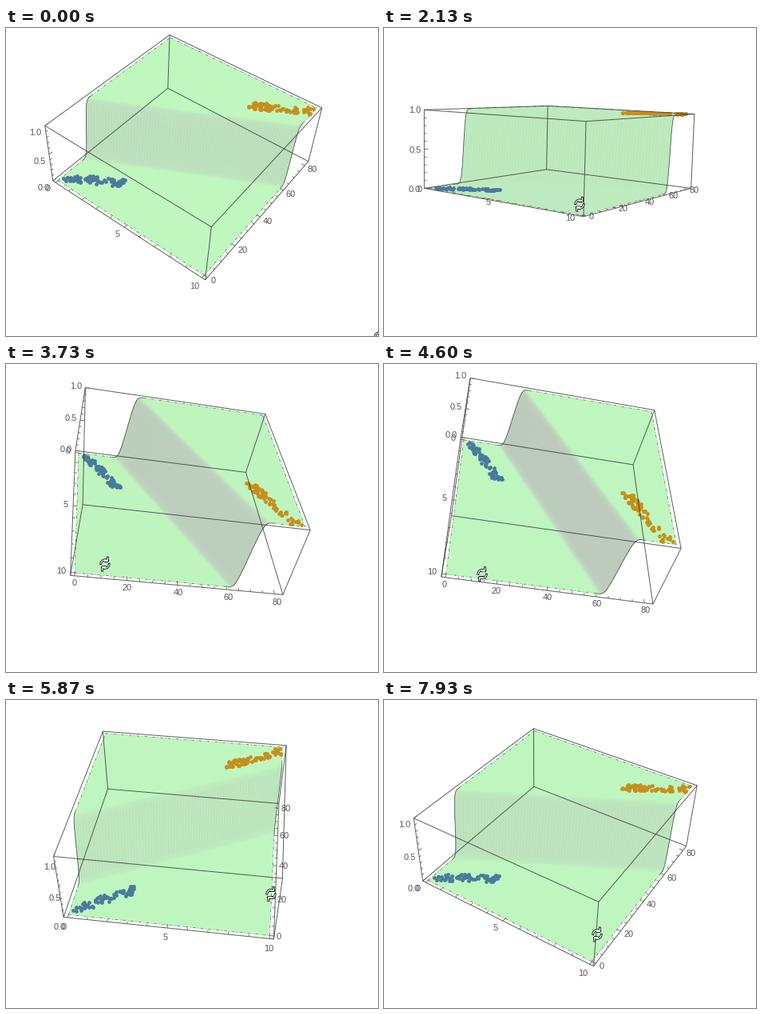
These frames come from a looping animation (466 by 385 pixels, 8 s). A matplotlib script:

```python
from itertools import combinations, product

import numpy as np
import matplotlib.pyplot as plt
from matplotlib.animation import FuncAnimation
from matplotlib.collections import LineCollection, PolyCollection

W, H, DPI = 466, 385, 100
PX = 72 / DPI
FRAMES, STEP = 160, 50
LO = np.array([-0.2, -1.6, 0.0])
HI = np.array([10.2, 83.6, 1.0])
SIDES = np.array([1.0, 1.0, 0.4])
EYE = 3.45
STEEP = 1.7
X_END, Y_END = 10, 82


def look(az, el, roll, size, center, hand):
    """Camera and pointer state as one vector; angles in degrees."""
    return np.array([*np.radians([az, el, roll]), size, *center, *hand])


def project(pts, state):
    """Data points to pixels in perspective."""
    az, el, roll, size, cx, cy = state[:6]
    p = (np.asarray(pts, float) - LO) / (HI - LO) - 0.5
    x, y, z = (p * SIDES).T
    right = x * np.cos(az) - y * np.sin(az)
    away = x * np.sin(az) + y * np.cos(az)
    up = z * np.cos(el) + away * np.sin(el)
    f = size * EYE / (EYE + away * np.cos(el) - z * np.sin(el))
    c, s = np.cos(roll), np.sin(roll)
    return np.column_stack([cx + f * (right * c + up * s),
                            cy - f * (up * c - right * s)])


start = look(-34.2, 44.5, 3.6, 238, (225, 146), (247, 310))
tilted = look(-37.2, 34.1, 1.3, 238, (225, 153), (245, 282))
level = look(-37.2, 3.5, 1.3, 240, (223, 153), (245, 214))
low = look(-51.8, 4.3, 2.0, 242, (217.5, 152), (195, 213))
side = look(-75.6, 34.3, 15.1, 251, (216.5, 152), (124, 250))
over = side + 0.4 * (side - low)
mid = look(-45.3, 19.9, 0.6, 243, (223, 154.5), (247, 253))
above = look(23.0, 58.2, 0.0, 251, (216.5, 161), (400, 234))
last = look(-31.5, 38.9, 1.5, 247.5, (220.5, 166.5), (267, 293))

# Drags with rests between them, times in ms.
TRACK = [(1133, start), (1467, tilted), (2200, level), (2533, level),
         (3067, low), (3733, side), (4133, over), (4467, over),
         (5200, mid), (6400, above), (6867, above), (7933, last)]
TIMES, STATES = zip(*TRACK)


def state_at(t):
    return np.array([np.interp(t, TIMES, col) for col in zip(*STATES)])


# Box edges join corners that differ in one coordinate.
CORNERS = np.array([np.where(k, HI, LO) for k in product((0, 1), repeat=3)])
EDGES = [(a, b) for a, b in combinations(range(8), 2)
         if np.sum(CORNERS[a] != CORNERS[b]) == 1]


def ridge(x):
    return 20.3 + 4.45 * x


def sigmoid(u):
    return 1 / (1 + np.exp(-STEEP * u))


U = np.linspace(-4.5, 4.5, 41)


def rim(x):
    """Surface profile at fixed x, from y = 0 to the far end."""
    y = np.concatenate([[0], ridge(x) + U, [Y_END]])
    z = np.concatenate([[0], sigmoid(U), [1]])
    return np.column_stack([np.full_like(y, x), y, z])


RIM0, RIM1 = rim(0), rim(X_END)
RIBS = [rim(x)[14:-14] for x in np.linspace(0.1, 9.9, 70)]

height = sigmoid((U[1:] + U[:-1]) / 2)
grade = 0.4 * STEEP * height * (1 - height) * (HI - LO)[1] * 1.13
STEEPNESS = np.concatenate([[0], grade / np.hypot(grade, 1), [0]])[:, None]
SLOPE_NORMAL = np.array([0.46, -0.88, 0.1])

rng = np.random.default_rng(4)


def cloud(n=72):
    """Distances from a corner along x and y, scattered about a diagonal."""
    d = rng.uniform(0.02, 2.95, n)
    return d, 5 * d + rng.uniform(0, 5.5, n)


dx, dy = cloud()
BLUE = np.column_stack([dx, dy, 0 * dx])
dx, dy = cloud()
GOLD = np.column_stack([X_END - dx, Y_END - dy, 0 * dx + 1])

# Axes: corner, coordinate, labelled values, format, minor step, side, pad.
AXES = [
    (LO, 0, np.arange(0, 11, 5), "{:.0f}", 1, (0, -1, 0), 4),
    ([HI[0], LO[1], 0], 1, np.arange(0, 81, 20), "{:.0f}", 5, (1, 0, 0), 1),
    (LO, 2, np.arange(0, 1.1, 0.5), "{:.1f}", 0.1, (0, -1, 0), 4),
]

fig = plt.figure(figsize=(W / DPI, H / DPI), dpi=DPI, facecolor="white")
ax = fig.add_axes([0, 0, 1, 1])
ax.set_xlim(0, W)
ax.set_ylim(H, 0)
ax.axis("off")


def lines(color, width, z, style="-"):
    coll = LineCollection([], colors=[color], linewidths=width * PX,
                          linestyles=style, zorder=z)
    ax.add_collection(coll, autolim=False)
    return coll


def dots(color):
    return ax.scatter([], [], c=color, s=(4.8 * PX) ** 2, linewidths=0,
                      zorder=4)


faces = PolyCollection([], antialiaseds=False, linewidths=0, zorder=1)
ax.add_collection(faces, autolim=False)
ribs = lines((0.6, 0.55, 0.6, 0.06), 1.3, 2)
curves = lines("#4c564c", 0.8, 3)
borders = lines("#5c6c5c", 0.7, 3, (0, (5, 4, 1, 4)))
box = lines((0.2, 0.2, 0.2, 0.78), 1, 5)
ticks = lines("#666666", 0.9, 5)
blue, gold = dots("#4a7a9c"), dots("#c68f1c")
labels = [[ax.text(0, 0, fmt.format(v), family="Liberation Sans",
                   fontsize=11 * PX, color="#555555", ha="center",
                   va="center", zorder=6) for v in values]
          for _, _, values, fmt, *_ in AXES]

# Pointer: two hollow curved arrows, the second a half turn of the first.
ang = np.radians(np.linspace(185, 310, 12))
arc = 5.2 * np.column_stack([np.cos(ang), np.sin(ang)])
tip = arc[-1]
arrow = np.vstack([arc, tip + (-4, 0), tip, tip + (0, -4), [[np.nan] * 2]])
GLYPH = np.vstack([arrow, -arrow])
ink, = ax.plot([], [], color="black", lw=2.8 * PX, zorder=8)
core, = ax.plot([], [], color="white", lw=1.2 * PX, zorder=9)


def draw_axes(state):
    marks = []
    for (base, k, values, _, minor, side, pad), texts in zip(AXES, labels):
        def anchor(value):
            p = np.array(base, float)
            p[k] = value
            a, b = project([p, p + side * (HI - LO) * 0.02], state)
            return a, (b - a) / max(np.hypot(*(b - a)), 1e-9)

        for v in np.arange(values[0], values[-1] + minor / 2, minor):
            p, d = anchor(v)
            size = 5 if np.isclose(values, v).any() else 3
            marks.append([p, p - d * size])
        for v, text in zip(values, texts):
            p, d = anchor(v)
            half = 1.5 + 2.7 * len(text.get_text().replace(".", ""))
            text.set_position(p + d * (pad + abs(d) @ [half, 8]))
    ticks.set_segments(marks)


def face_colors(state):
    az, el = state[:2]
    to_eye = np.array([-np.sin(az) * np.cos(el),
                       -np.cos(az) * np.cos(el), np.sin(el)])
    to_right = np.array([np.cos(az), -np.sin(az), 0])
    light = 190 + SLOPE_NORMAL @ (48 * to_eye + 15 * to_right)
    flat = np.array([191, 231 + 23 * np.sin(el), 191])
    slope = np.array([190, light, 190])
    return (flat + (slope - flat) * STEEPNESS) / 255


def draw_scene(state):
    r0, r1 = project(RIM0, state), project(RIM1, state)
    faces.set_verts(np.stack([r0[:-1], r1[:-1], r1[1:], r0[1:]], axis=1))
    faces.set_facecolor(face_colors(state))
    ribs.set_segments([project(r, state) for r in RIBS])
    curves.set_segments([r0[1:-1], r1[1:-1]])
    borders.set_segments([[r0[0], r1[0]], [r0[-1], r1[-1]],
                          r0[:2], r0[-2:], r1[:2], r1[-2:]])
    c = project(CORNERS, state)
    box.set_segments([c[[a, b]] for a, b in EDGES])
    blue.set_offsets(project(BLUE, state))
    gold.set_offsets(project(GOLD, state))
    draw_axes(state)


def draw_pointer(t, hand):
    if t < 60:
        pos = np.array([467.5, 386])
    elif t < 260:
        pos = np.array([-50, -50])
    else:
        enter = np.clip((t - 267) / 666, 0, 1)
        pos = hand + (1 - enter) * np.array([193, 25])
    for line in (ink, core):
        line.set_data(*(GLYPH + pos).T)


def update(i):
    # The scene moves in steps of 1/15 second.
    t = np.floor((i * STEP + 35) * 0.015) / 0.015
    state = state_at(t)
    draw_scene(state)
    draw_pointer(t, state[6:])
    return []


anim = FuncAnimation(fig, update, frames=FRAMES, interval=STEP,
                     repeat=True, repeat_delay=0, blit=False)
plt.show()
```
